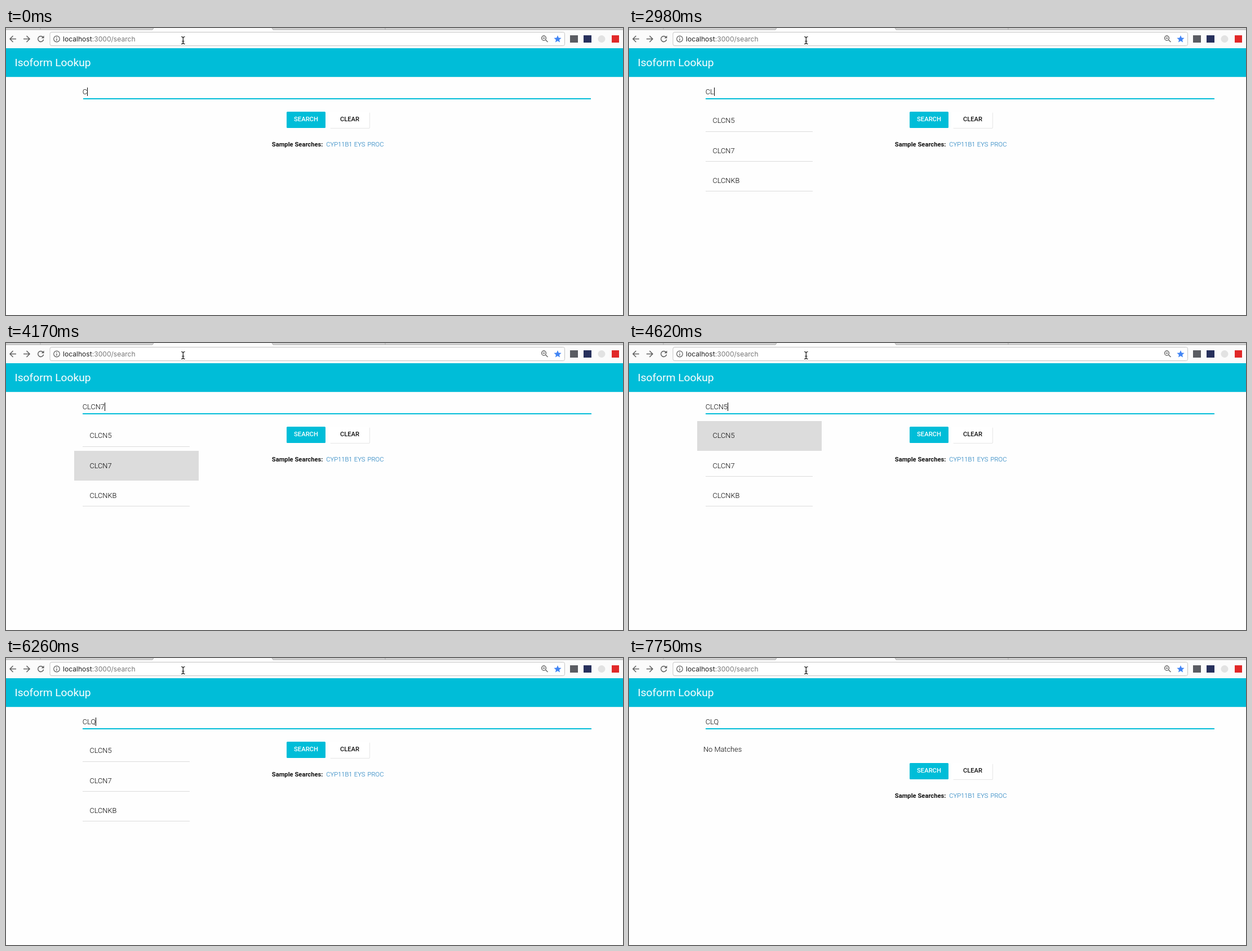
An HTML page that plays this animation: 1095x511 px, repeating every 8 s.

```html
<!DOCTYPE html>
<html lang="en">
<head>
<meta charset="utf-8">
<title>Isoform Lookup</title>
<style>
  html, body { margin: 0; width: 100%; height: 100%; overflow: hidden; background: #fefefe; }
  svg { display: block; width: 1095px; height: 511px; }
  text { font-family: Roboto, sans-serif; fill: #111; }
  .body { font-size: 12.8px; font-weight: 300; fill: #000; }
  .small { font-size: 11.2px; }
  .button { font-weight: 500; text-anchor: middle; }
  .link { font-weight: 300; fill: #0872b8; }
  .url { font: 12.1px Inter, sans-serif; fill: #777; }
  .icon { fill: none; stroke: #5f5f5f; stroke-width: 1.5; }
</style>
</head>
<body>
<svg viewBox="0 0 1095 511">
  <rect width="1095" height="511" fill="#fefefe"/>

  <!-- browser bar -->
  <rect width="1095" height="36" fill="#fbfbfb"/>
  <path d="M0 0H262L260 3H0ZM472 0H1095V3H474Z" fill="#d2d2d2"/>
  <path d="M0 3H260L262 0M472 0L474 3H1095M61 0V3M673 0V3" fill="none" stroke="#aaa"/>
  <rect x="78" y="7.5" width="913.5" height="24" rx="3" fill="#fff" stroke="#c4c4c4"/>
  <g class="icon">
    <path d="M18 19.5H7.5M12.5 14L7 19.5L12.5 25"/>
    <path d="M31 19.5H41.5M36.5 14L42 19.5L36.5 25"/>
    <path d="M65.6 16.3A5 5 0 1 0 66.6 20.5"/>
    <path d="M67.5 13.5V18.3H62.7Z" fill="#5f5f5f" stroke="none"/>
    <circle cx="90" cy="19.5" r="5.3" stroke-width="1.2"/>
    <path d="M90 18.7V22.7M90 16V17.5" stroke-width="1.3"/>
    <circle cx="954.5" cy="18" r="4" stroke-width="1.3"/>
    <path d="M957.5 21L961.5 25M952.5 18H956.5" stroke-width="1.3"/>
  </g>
  <path d="M979 13L980.9 17.4L985.6 17.8L982 21L983.1 25.6L979 23.1L974.9 25.6L976 21L972.4 17.8L977.1 17.4Z" fill="#4285f4"/>
  <rect x="1001" y="13" width="14" height="13" fill="#5a5c62"/>
  <rect x="1025" y="13" width="14" height="13" fill="#27305c"/>
  <circle cx="1057" cy="19.5" r="6.5" fill="#e2e2e2"/>
  <rect x="1075" y="13" width="13" height="13" fill="#e12828"/>
  <text class="url" x="101" y="24"><tspan fill="#222">localhost</tspan>:3000/search</text>
  <path d="M311 15.5Q314.3 15.5 314.3 18V26Q314.3 28.5 311 28.5M317.6 15.5Q314.3 15.5 314.3 18M314.3 26Q314.3 28.5 317.6 28.5M312.3 23.5H316.3" fill="none" stroke="#111" stroke-width="1.2"/>

  <!-- page -->
  <rect y="36" width="1095" height="51" fill="#00bdd8"/>
  <rect y="87" width="1095" height="1" fill="#d9f1f5"/>
  <text x="15.5" y="68" font-size="19.2" style="fill:#fff">Isoform Lookup</text>

  <g id="list"></g>
  <text id="none" class="body" x="132" y="167">No Matches</text>

  <rect id="line" y="125" height="2" fill="#00bdd8"/>
  <text id="input" class="body" x="135.8" y="118"></text>
  <rect id="caret" y="106" width="1" height="15" fill="#000"/>

  <g id="actions">
    <rect x="498" y="149" width="69" height="29" rx="1.5" fill="#00bdd8"/>
    <text class="small button" x="532.5" y="166" style="fill:#fff">SEARCH</text>
    <rect x="575" y="150" width="71" height="29" rx="2" fill="#e6e6e6"/>
    <rect x="574.5" y="149" width="70.5" height="29" rx="1.5" fill="#fff"/>
    <text class="small button" x="610" y="166">CLEAR</text>
    <text class="small" x="471.8" y="211" font-weight="700">Sample Searches:</text>
    <text class="small link" x="568.2" y="211">CYP11B1</text>
    <text class="small link" x="617.8" y="211">EYS</text>
    <text class="small link" x="641.6" y="211">PROC</text>
  </g>
</svg>
<script>
const LOOP = 8000, ROW = 53.5;
const genes = ['CLCN5', 'CLCN7', 'CLCNKB'];
const caretX = { C: 144, CL: 151, CLQ: 159, CLCN5: 175, CLCN7: 175 };

// Each step keeps the values it does not mention.
const steps = [
  [0, { text: 'C', caret: true, view: '', pick: -1, inset: 1 }],
  [150, { inset: 0 }],
  [750, { caret: false }],
  [1200, { caret: true }],
  [1640, { caret: false }],
  [1790, { text: 'CL', caret: true }],
  [2390, { caret: false }],
  [2830, { caret: true }],
  [2980, { view: 'list' }],
  [3430, { caret: false }],
  [3880, { caret: true }],
  [4030, { text: 'CLCN5', pick: 0 }],
  [4170, { text: 'CLCN7', pick: 1 }],
  [4620, { text: 'CLCN5', pick: 0 }],
  [4910, { text: 'CL', pick: -1 }],
  [5510, { caret: false }],
  [5960, { caret: true }],
  [6260, { text: 'CLQ' }],
  [6860, { caret: false }],
  [7300, { caret: true }],
  [7450, { view: 'none' }],
  [7750, { caret: false }]
];

const $ = id => document.getElementById(id);
const set = (el, attrs) => {
  for (const key in attrs) el.setAttribute(key, attrs[key]);
};
const show = (el, on) => { el.style.display = on ? '' : 'none'; };

const rows = genes.map((gene, i) => {
  const g = document.createElementNS('http://www.w3.org/2000/svg', 'g');
  const top = Math.round(139 + i * (ROW - 0.1));
  g.innerHTML = `<rect x="121" y="${top}" width="221" height="53" fill="#dcdcdc"/>
    <rect x="136" y="${[184, 237, 290][i]}" width="190" height="1" fill="#dcdcdc"/>
    <text class="body" x="148.4" y="${169 + i * ROW}">${gene}</text>`;
  $('list').append(g);
  return g.children;
});

function draw(ms) {
  const s = {};
  for (const [at, change] of steps) if (at <= ms) Object.assign(s, change);
  $('input').textContent = s.text;
  set($('caret'), { x: caretX[s.text] });
  show($('caret'), s.caret);
  set($('line'), { x: 136 + s.inset, width: 903 - 2 * s.inset });
  show($('list'), s.view === 'list');
  show($('none'), s.view === 'none');
  rows.forEach(([fill, rule], i) => {
    show(fill, i === s.pick);
    show(rule, i !== s.pick);
  });
  set($('actions'), { transform: `translate(0 ${s.view === 'none' ? 38 : 0})` });
}

const start = performance.now();
function tick() {
  draw((performance.now() - start) % LOOP);
  requestAnimationFrame(tick);
}
tick();
</script>
</body>
</html>
```
